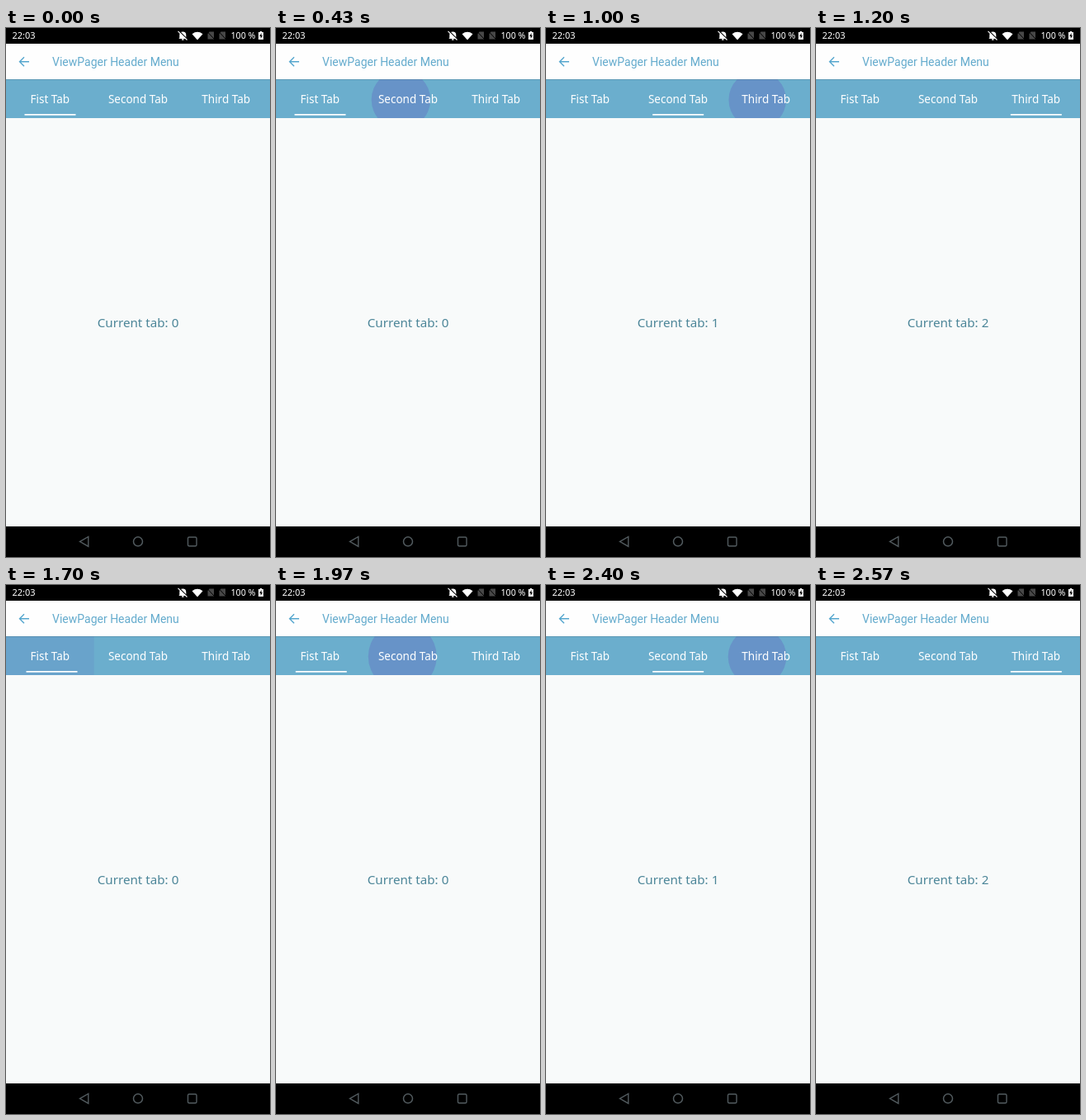
Animation, 320 px wide and 640 px high, one loop 2.61 s. Source, as an HTML page with a canvas:

```html
<!DOCTYPE html>
<html lang="en">
<head>
<meta charset="utf-8">
<title>Header tabs</title>
<style>
  html, body { margin: 0; width: 100%; height: 100%; overflow: hidden; background: #000; }
  canvas { display: block; width: 320px; height: 640px; }
</style>
</head>
<body>
<canvas id="stage"></canvas>
<script>
const W = 320, H = 640, LOOP = 2610, TAB_W = W / 3;
const STATUS_END = 19, BAR_TOP = 62, BAR_END = 109, NAV_TOP = 603;
const COLOR = {
  light: '#fff', page: '#f8fafa', header: '#fefefe', bar: '#6baecd',
  title: '#64abcd', arrow: '#55a6ce', body: '#4b8598', ripple: '#6793c8',
  nav: '#525b5f', dim: '#484848'
};
const SANS = '"Noto Sans", sans-serif';
const LABELS = ['Fist Tab', 'Second Tab', 'Third Tab'];

// The screen runs at double speed and is refreshed 30 times a second.
const TICK = 2000 / 30;
const SLIDE = 300, RIPPLE_GROW = 225, RIPPLE_FADE = 150, RIPPLE_LEAD = 46;
const RIPPLE_FROM = TAB_W * 0.3, RIPPLE_TO = Math.hypot(TAB_W, BAR_END - BAR_TOP) / 2;

// at: first tick; x: touch point; offset: ms the slide has run at that tick
const TAPS = [
  { at: 13, from: 0, to: 1, x: 150, offset: 0 },
  { at: 30, from: 1, to: 2, x: 255, offset: -5 },
  { at: 47, from: 2, to: 0, x: 50, offset: -5 },
  { at: 59, from: 0, to: 1, x: 149.5, offset: 21 },
  { at: 72, from: 1, to: 2, x: 254.5, offset: -2 }
];

const canvas = document.getElementById('stage');
const ctx = canvas.getContext('2d');
const dpr = window.devicePixelRatio || 1;
canvas.width = W * dpr;
canvas.height = H * dpr;
ctx.scale(dpr, dpr);

const mix = (a, b, p) => a + (b - a) * p;
const clamp = v => Math.min(1, Math.max(0, v));

// cubic-bezier(.4, 0, .2, 1)
function ease(p) {
  if (p <= 0 || p >= 1) return clamp(p);
  let lo = 0, hi = 1, u = p;
  for (let i = 0; i < 20; i++) {
    u = (lo + hi) / 2;
    const x = 1.2 * u * (1 - u) ** 2 + 0.6 * u * u * (1 - u) + u ** 3;
    if (x < p) lo = u; else hi = u;
  }
  return u * u * (3 - 2 * u);
}

function rect(x, y, w, h, color) {
  ctx.fillStyle = color;
  ctx.fillRect(x, y, w, h);
}

function text(str, x, y, font, color, align = 'left') {
  ctx.font = font;
  ctx.fillStyle = color;
  ctx.textAlign = align;
  ctx.fillText(str, x, y);
}

function path(d, color, width) {
  const p = new Path2D(d);
  if (width) {
    ctx.strokeStyle = color;
    ctx.lineWidth = width;
    ctx.stroke(p);
  } else {
    ctx.fillStyle = color;
    ctx.fill(p);
  }
}

function statusBar() {
  rect(0, 0, W, STATUS_END, '#000');
  text('22:03', 7.5, 13, '11px ' + SANS, COLOR.light);
  // muted bell
  path('M210.3 12 V8.5 Q210.3 4.5 214.3 4.5 Q218.3 4.5 218.3 8.5 V12 L219.3 13 H209.3 Z', COLOR.light);
  path('M213 14 H215.6', COLOR.light, 1.4);
  path('M209.5 3.5 L220.5 14.5', '#000', 1.6);
  path('M208.5 3.8 L219.5 14.5', COLOR.light, 1.1);
  // wifi
  path('M225.5 7.2 Q232 2.4 238.5 7.2 L232 14.5 Z', COLOR.light);
  // empty SIM slots
  for (const x of [244, 258]) {
    path(`M${x + 2.5} 4.5 H${x + 8} V13.5 H${x + 0.5} V7 Z`, COLOR.dim);
    path(`M${x + 0.5} 5 L${x + 8} 13`, '#000', 1);
  }
  text('100 %', 272.5, 13, '10.7px ' + SANS, COLOR.light);
  // charging battery
  path('M306 5 H307.8 V4 H310.2 V5 H312 V14 H306 Z', COLOR.light);
  path('M309.6 6 L307.2 10 H308.7 V13 L311 9 H309.6 Z', '#000');
}

function header() {
  rect(0, STATUS_END, W, BAR_TOP - STATUS_END, COLOR.header);
  path('M28 40.8 H16.8 M22 35.3 L16.5 40.8 L22 46.3', COLOR.arrow, 1.4);
  text('ViewPager Header Menu', 56, 46, '14px Roboto, sans-serif', COLOR.title);
}

function ripple(tap, age) {
  const fade = clamp((age - RIPPLE_GROW) / RIPPLE_FADE);
  if (fade === 1) return;
  const grow = ease(age / RIPPLE_GROW);
  ctx.save();
  ctx.beginPath();
  ctx.rect(tap.to * TAB_W, BAR_TOP, TAB_W, BAR_END - BAR_TOP);
  ctx.clip();
  ctx.globalAlpha = 1 - fade;
  ctx.fillStyle = COLOR.ripple;
  ctx.beginPath();
  ctx.arc(mix(tap.x, (tap.to + 0.5) * TAB_W, grow), mix(87, 85.5, grow),
    mix(RIPPLE_FROM, RIPPLE_TO, grow), 0, Math.PI * 2);
  ctx.fill();
  ctx.restore();
}

function tabs(tap, age) {
  rect(0, BAR_TOP, W, BAR_END - BAR_TOP, COLOR.bar);
  if (tap) ripple(tap, age + RIPPLE_LEAD);
  rect(0, BAR_TOP, W, 1, 'rgba(60, 110, 135, 0.35)');
  LABELS.forEach((label, i) =>
    text(label, (i + 0.5) * TAB_W, 91, '13.5px ' + SANS, COLOR.light, 'center'));
  const pos = tap ? mix(tap.from, tap.to, ease(age / SLIDE)) : 0;
  rect(22.5 + pos * TAB_W, 104, 62, 1.7, COLOR.light);
}

function navBar() {
  rect(0, NAV_TOP, W, H - NAV_TOP, '#000');
  path('M89.5 621.3 L99.8 615.5 V627.2 Z', COLOR.nav, 1.4);
  path('M165.5 621.3 A5.5 5.5 0 1 1 154.5 621.3 A5.5 5.5 0 1 1 165.5 621.3 Z', COLOR.nav, 1.5);
  path('M222 616 H229.5 Q231 616 231 617.5 V625.2 Q231 626.7 229.5 626.7 H222 Q220.5 626.7 220.5 625.2 V617.5 Q220.5 616 222 616 Z', COLOR.nav, 1.4);
}

function draw(ms) {
  const tick = Math.floor((ms % LOOP) * 0.03 + 0.15);
  const tap = TAPS.filter(t => t.at <= tick).pop();
  const age = tap ? (tick - tap.at) * TICK + tap.offset : 0;
  const current = !tap ? 0 : tick > tap.at ? tap.to : tap.from;

  rect(0, 0, W, H, COLOR.page);
  statusBar();
  header();
  tabs(tap, age);
  text('Current tab: ' + current, 160, 362, '15.2px ' + SANS, COLOR.body, 'center');
  navBar();
}

const start = performance.now();
function frame() {
  draw(performance.now() - start);
  requestAnimationFrame(frame);
}
frame();
</script>
</body>
</html>
```
